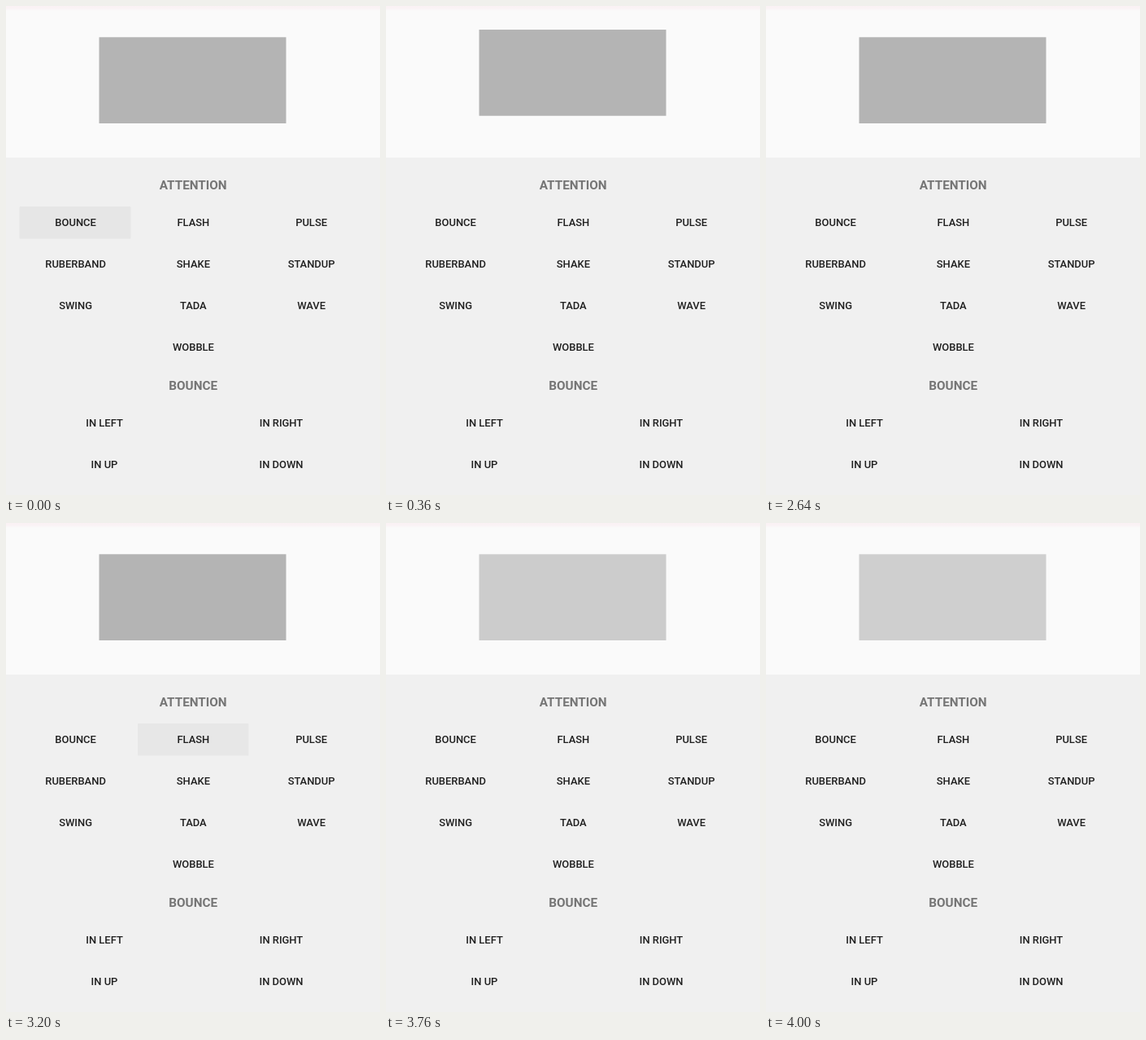
An HTML page for the animation above (4080 ms loop, 460 by 600 pixels).

```html
<!DOCTYPE html>
<html lang="en">
<head>
<meta charset="utf-8">
<style>
  html, body { margin: 0; width: 100%; height: 100%; overflow: hidden; background: #f0f0f0; }
  svg { display: block; width: 460px; height: 600px; }
  text { font-family: Roboto, sans-serif; text-anchor: middle; }
  .title { font-size: 15.3px; font-weight: 700; fill: #757575; }
  .label { font-size: 12.95px; font-weight: 500; fill: #202020; }
</style>
</head>
<body>
<svg viewBox="0 0 460 600">
  <defs>
    <linearGradient id="edge" x2="0" y2="1">
      <stop offset="0" stop-color="#faf1f4"/>
      <stop offset=".5" stop-color="#faf3f5"/>
      <stop offset="1" stop-color="#fafafa"/>
    </linearGradient>
  </defs>
  <rect width="460" height="600" fill="#f0f0f0"/>
  <rect width="460" height="186" fill="#fafafa"/>
  <rect width="460" height="6" fill="url(#edge)"/>
  <rect id="box" x="114.5" y="38.3" width="230" height="105.7" fill="#b4b4b4"/>
  <rect id="bouncePress" x="16.5" y="246" width="137" height="39.5" rx="1" fill="#e6e6e6"/>
  <rect id="flashPress" x="162" y="246" width="136.5" height="39.5" rx="1" fill="#e6e6e6"/>
  <g id="labels"></g>
</svg>
<script>
const LOOP = 4080, STEP = 40, DURATION = 1000;
const BOUNCE_START = -240, FLASH_START = 3204;
const BOUNCE_KEYS = [0, 0, -20, 0, -10, 0, 0];
const FLASH_KEYS = [1, 0, 1, 0, 1];
const $ = id => document.getElementById(id);

function addText(kind, text, x, baseline) {
  const node = document.createElementNS('http://www.w3.org/2000/svg', 'text');
  node.setAttribute('class', kind);
  node.setAttribute('x', x);
  node.setAttribute('y', baseline);
  node.textContent = text;
  $('labels').append(node);
}

function addRow(y, columns, names) {
  names.forEach((name, i) => addText('label', name, columns[i], y));
}

const THREE = [85.6, 230.4, 375.6], TWO = [121, 338.5];
addText('title', 'ATTENTION', 230.2, 225);
addRow(270.4, THREE, ['BOUNCE', 'FLASH', 'PULSE']);
addRow(321.4, THREE, ['RUBERBAND', 'SHAKE', 'STANDUP']);
addRow(372.4, THREE, ['SWING', 'TADA', 'WAVE']);
addRow(423.4, [230.4], ['WOBBLE']);
addText('title', 'BOUNCE', 230.2, 471.4);
addRow(516.4, TWO, ['IN LEFT', 'IN RIGHT']);
addRow(567.4, TWO, ['IN UP', 'IN DOWN']);

const clamp = v => Math.min(1, Math.max(0, v));

// Evenly spaced keys under one accelerate-decelerate curve.
function animate(keys, elapsed) {
  const eased = (1 - Math.cos(Math.PI * clamp(elapsed / DURATION))) / 2;
  const pos = eased * (keys.length - 1);
  const i = Math.min(Math.floor(pos), keys.length - 2);
  return keys[i] + (keys[i + 1] - keys[i]) * (pos - i);
}

// Button highlight: fades in around the tap, then out.
const press = elapsed => Math.min(clamp((elapsed + 150) / 190), clamp((480 - elapsed) / 240));

function draw(now) {
  const t = Math.floor((now % LOOP) / STEP) * STEP;
  $('box').setAttribute('transform', `translate(0 ${animate(BOUNCE_KEYS, t - BOUNCE_START)})`);
  $('box').setAttribute('opacity', animate(FLASH_KEYS, t - FLASH_START));
  $('bouncePress').setAttribute('opacity', press(t - BOUNCE_START));
  $('flashPress').setAttribute('opacity', press(t - FLASH_START));
}

const start = performance.now();
function tick() {
  draw(performance.now() - start);
  requestAnimationFrame(tick);
}
tick();
</script>
</body>
</html>
```
